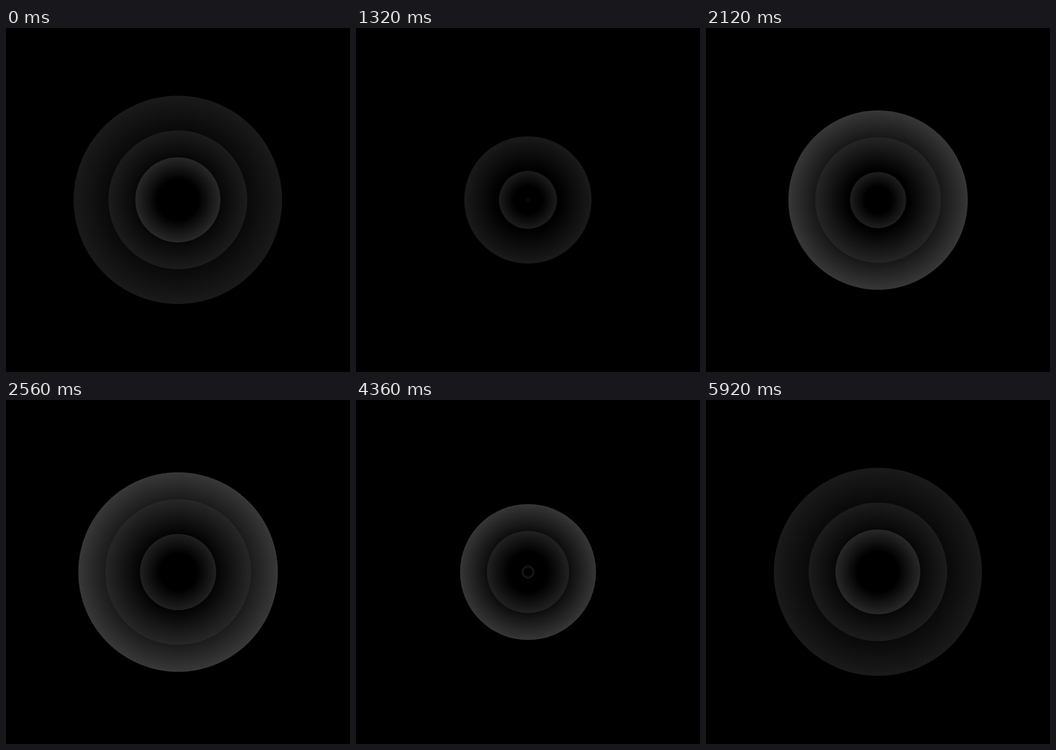
Write an HTML page that moves like this. It is 748 by 748 pixels and loops after 6000 ms.

```html
<!DOCTYPE html>
<html lang="en">
<head>
<meta charset="utf-8">
<title>Rings</title>
<style>
  html, body { margin: 0; width: 100%; height: 100%; overflow: hidden; background: #000; }
  svg { display: block; width: 100vw; height: 100vh; }
</style>
</head>
<body>
<svg id="stage" viewBox="0 0 748 748"></svg>
<script>
const NS = 'http://www.w3.org/2000/svg';
const LOOP = 6000, HALF = LOOP / 2, STEP = 40;
const TRAVEL = 314.5;
const stage = document.getElementById('stage');

// Each ring sits at a fixed depth; its radius is the distance to the moving plane.
// Shades are [plane position, grey level of the rim].
const rings = [
  { depth: 226.5, shades: [[0, 26], [230, 27], [TRAVEL, 32]] },
  { depth: 151, shades: [[0, 28], [74, 27], [237, 33], [TRAVEL, 39]] },
  { depth: 92.5, shades: [[0, 40], [74, 28], [92, 28], [237, 54], [TRAVEL, 56]] }
];

function add(parent, name, attrs) {
  const node = document.createElementNS(NS, name);
  for (const key in attrs) node.setAttribute(key, attrs[key]);
  return parent.appendChild(node);
}

const defs = add(stage, 'defs', {});
const discs = add(stage, 'g', {});
rings.forEach((ring, i) => {
  const gradient = add(defs, 'radialGradient', { id: 'shade' + i });
  add(gradient, 'stop', { offset: 0.48, 'stop-color': '#000' });
  ring.rim = add(gradient, 'stop', { offset: 1 });
  ring.disc = add(discs, 'circle', { cy: 374, fill: `url(#shade${i})` });
});

// Cubic Bezier easing with control points (a, 0) and (b, 1).
function ease(x, a, b) {
  let low = 0, high = 1;
  for (let i = 0; i < 30; i++) {
    const t = (low + high) / 2, u = 1 - t;
    if (3 * a * t * u * u + 3 * b * t * t * u + t * t * t < x) low = t;
    else high = t;
  }
  return low * low * (3 - 2 * low);
}

function interpolate(points, x) {
  for (let i = 1; i < points.length; i++) {
    const [x0, y0] = points[i - 1], [x1, y1] = points[i];
    if (x <= x1) return y0 + (y1 - y0) * (x - x0) / (x1 - x0);
  }
  return points[points.length - 1][1];
}

function render(time) {
  const t = Math.floor(time % LOOP / STEP) * STEP;
  const progress = t < HALF
    ? ease(t / HALF, 0.755, 0.263)
    : 1 - ease((t - HALF) / HALF, 0.75, 0.437);
  const plane = TRAVEL * progress;
  const center = 373.7 + 0.5 * progress;

  for (const ring of rings) {
    const grey = interpolate(ring.shades, plane).toFixed(1);
    ring.radius = Math.abs(ring.depth - plane);
    ring.disc.setAttribute('r', ring.radius);
    ring.disc.setAttribute('cx', center);
    ring.disc.setAttribute('cy', center);
    ring.rim.setAttribute('stop-color', `rgb(${grey},${grey},${grey})`);
  }
  // Larger discs lie behind smaller ones.
  [...rings].sort((p, q) => q.radius - p.radius).forEach(ring => discs.appendChild(ring.disc));
}

const start = performance.now();
function tick() {
  render(performance.now() - start);
  requestAnimationFrame(tick);
}
tick();
</script>
</body>
</html>
```
